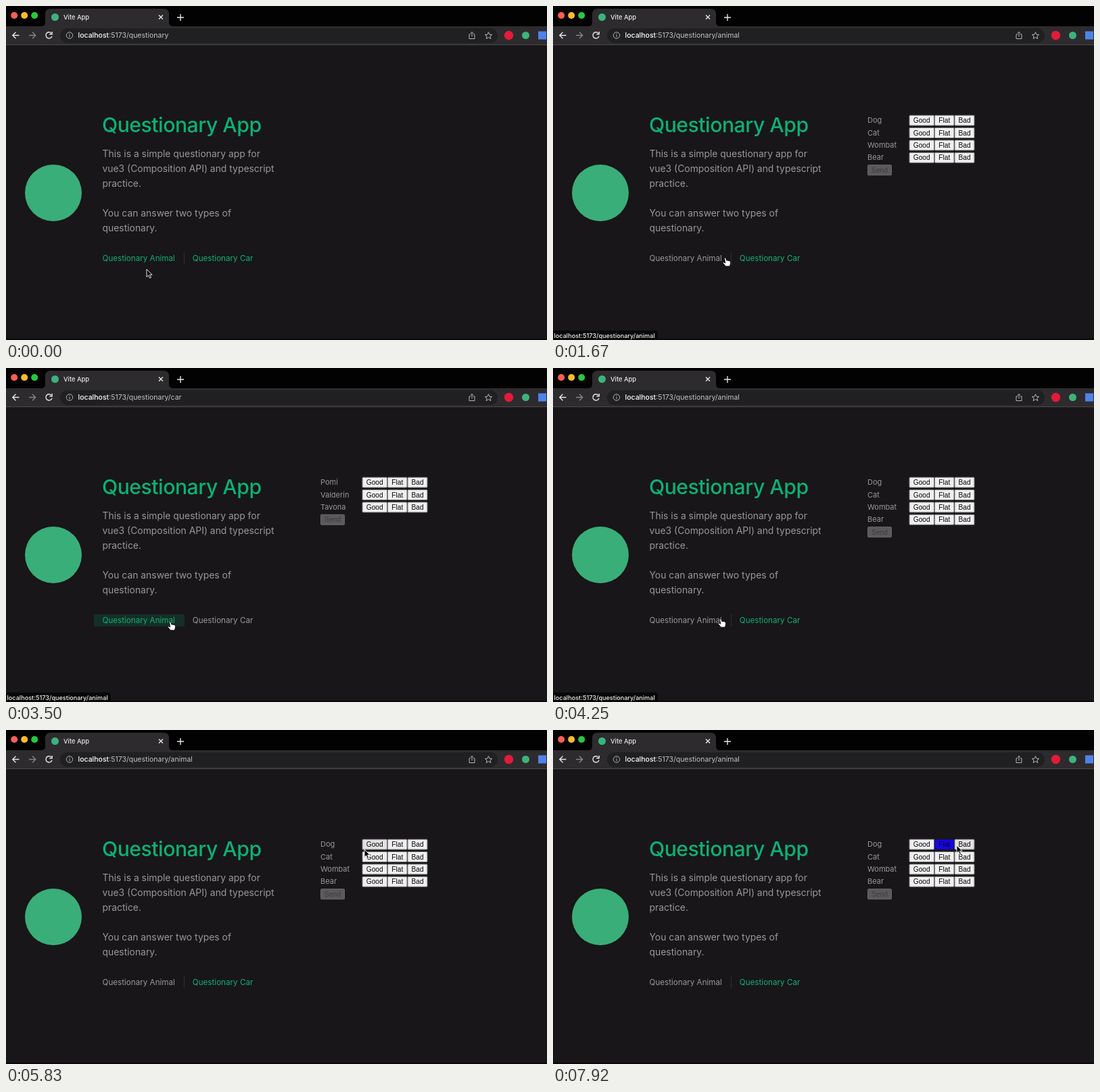
Recreate the animation shown at these times as an HTML page. Size 800 by 495 pixels, loop 8000 ms.

```html
<!DOCTYPE html>
<html lang="en">
<head>
<meta charset="utf-8">
<title>Questionary App</title>
<style>
  html, body { margin: 0; width: 100%; height: 100%; overflow: hidden; background: #181618; }
  svg { display: block; width: 800px; height: 495px; }
  text { font-family: Inter, "Open Sans", sans-serif; white-space: pre; }
  .button text { font: 10.2px "Liberation Sans", Arial, sans-serif; text-anchor: middle; }
  .line { fill: none; stroke: #e6e6e8; stroke-width: 1.4; }
  .title { font-size: 30.2px; font-weight: 500; letter-spacing: -.5px; fill: #0cb176; }
  .copy { font-size: 13.9px; fill: #989799; }
  .nav { font-size: 11.65px; }
  .cell { font-size: 11px; fill: #989799; }
</style>
</head>
<body>
<svg viewBox="0 0 800 495">
  <rect width="800" height="495" fill="#181618"/>
  <rect y="493" width="800" height="2" fill="#09080a"/>

  <rect width="800" height="30" fill="#020203"/>
  <path d="M52 30q6 0 6-6V12q0-8 8-8H233q8 0 8 8v12q0 6 6 6z" fill="#2d2b2e"/>
  <rect y="30" width="800" height="27" fill="#2d2b2e"/>
  <rect y="57" width="800" height="1" fill="#4a494c"/>
  <circle cx="12.200" cy="14" r="5" fill="#ff5d55"/>
  <circle cx="27.200" cy="14" r="5" fill="#fcbb2d"/>
  <circle cx="42.200" cy="14" r="5" fill="#27c83f"/>
  <circle cx="72.500" cy="16.500" r="5.500" fill="#3cb37d"/>
  <text x="85" y="20" font-size="9.300" font-weight="500" fill="#e9e9eb">Vite App</text>
  <path class="line" d="M226 13.500l6 6m0-6l-6 6"/>
  <path class="line" d="M258 12v10m-5-5h10"/>

  <path class="line" d="M19.500 43.500h-9.500m4.500-4.700l-4.700 4.700 4.700 4.700"/>
  <path class="line" style="stroke:#858487" d="M34 43.500h9.500m-4.500-4.700l4.700 4.700-4.700 4.700"/>
  <path class="line" d="M67 40.200a4.600 4.600 0 1 0 1 4.600M68.200 38v3.800h-3.800"/>
  <rect x="80" y="33" width="647" height="22" rx="11" fill="#201f22"/>
  <g class="line" style="stroke:#b4b4b8;stroke-width:1">
    <circle cx="94" cy="43.500" r="4.700"/>
    <path d="M94 42.800v3.400m0-5.600v1.200"/>
    <path d="M687 42h-2v6.500h8V42h-2m-2 3.500V38.500m-2 2l2-2 2 2"/>
    <path d="M713.500 38.700l1.500 3.500 3.700.3-2.800 2.400.9 3.600-3.300-2-3.300 2 .9-3.600-2.800-2.400 3.700-.3z"/>
  </g>
  <text x="106.500" y="47.300" font-size="10.500" fill="#c2c2c5"><tspan fill="#fff" font-weight="500">localhost</tspan><tspan id="path"></tspan></text>
  <circle cx="743.500" cy="43.500" r="6.700" fill="#e31b39"/>
  <circle cx="768.500" cy="43.500" r="5.500" fill="#3cb37d"/>
  <rect x="787" y="37.500" width="12" height="12" fill="#4f82e8"/>

  <circle cx="70" cy="277" r="42" fill="#3aae78"/>
  <text class="title" x="142" y="187">Questionary App</text>
  <g class="copy">
    <text x="142.500" y="223.700">This is a simple questionary app for</text>
    <text x="142.500" y="245.700">vue3 (Composition API) and typescript</text>
    <text x="142.500" y="267.700">practice.</text>
    <text x="142.500" y="311.700">You can answer two types of</text>
    <text x="142.500" y="333.700">questionary.</text>
  </g>
  <rect id="divider" x="263" y="365" width="1" height="18" fill="#302f32"/>
  <g class="nav">
    <rect id="animalGlow" x="130" y="365" width="134" height="18" fill="#00bd7e"/>
    <rect id="carGlow" x="263" y="365" width="115" height="18" fill="#00bd7e"/>
    <text id="animalLink" x="142.500" y="378.300">Questionary Animal</text>
    <text id="carLink" x="275.800" y="378.300">Questionary Car</text>
  </g>

  <g id="animalTable"></g>
  <g id="carTable"></g>

  <g id="status">
    <path id="bubble" fill="#070708"/>
    <text id="statusText" x="1.500" y="491.700" font-size="9.150" font-weight="500" fill="#f2f2f3"></text>
  </g>

  <path id="arrow" d="M0 0v11.500l2.600-2.400 1.900 4.200 2-.9-1.900-4.100h3.500z" fill="#050505" stroke="#fff" stroke-width=".9"/>
  <path id="hand" d="M-1 .8Q0-.6 1.200.8L2.300 4.300Q3.500 3.200 4.500 4.500 5.800 3.700 6.500 5 8 4.800 8 6.500L7.700 10 6.700 12.800H.8L-3.300 7.800Q-3.200 6.300-1.500 6.900L.2 8z" fill="#fff" stroke="#080808" stroke-width=".9"/>
</svg>
<script>
const LOOP = 8000, STEP = 1000 / 12;
const CLICK = { animal: 1080, car: 2450, animalAgain: 3800, good: 6660, flat: 7300 };
const ENTER = { animal: 460, car: 1860, animalAgain: 2900 };
const BUTTONS = [["Good", 526.5, 37.5], ["Flat", 564, 29.5], ["Bad", 593.5, 30]];
const ROW_Y = 161.6, ROW_GAP = 18.4;

// time, x, y of the pointer tip
const PATH = [
  [0, 208, 390], [250, 208, 389], [650, 207, 374], [1250, 210, 373],
  [1670, 254.5, 373], [2100, 304, 371], [2500, 306, 369.5], [2700, 303, 370],
  [3150, 246, 375], [3500, 242.5, 376], [4170, 242, 375], [4400, 262, 362],
  [5080, 524, 181], [5670, 530, 177], [5830, 530, 177], [6250, 536, 172],
  [6830, 536, 172], [7180, 574, 172], [7500, 575, 172], [7920, 597, 171]
];

const $ = id => document.getElementById(id);
const clamp = v => Math.max(0, Math.min(1, v));
const smooth = v => v * v * (3 - 2 * v);
const fade = (t, start) => smooth(clamp((t - start) / 400));
const mix = (a, b, k) => `rgb(${a.map((v, i) => Math.round(v + (b[i] - v) * k))})`;

function add(parent, tag, attrs, text = "") {
  const node = document.createElementNS("http://www.w3.org/2000/svg", tag);
  for (const key in attrs) node.setAttribute(key, attrs[key]);
  node.textContent = text;
  return parent.appendChild(node);
}

function addButton(parent, label, x, y, width, fill, stroke, color) {
  const group = add(parent, "g", { class: "button" });
  const box = add(group, "rect", { x: x + .5, y: y + .5, width: width - 1, height: 15, rx: 1, fill, stroke });
  add(group, "text", { x: x + width / 2, y: y + 11.5, fill: color }, label);
  return { box, x, y, width };
}

function buildTable(id, names) {
  const buttons = [];
  names.forEach((name, row) => {
    const y = ROW_Y + row * ROW_GAP;
    add($(id), "text", { class: "cell", x: 465, y: y + 11.6 }, name);
    for (const [label, x, width] of BUTTONS)
      buttons.push(addButton($(id), label, x, y, width, "#efefef", "#77767a", "#080808"));
  });
  addButton($(id), "Send", 465, ROW_Y + names.length * ROW_GAP, 36, "#5a595b", "#69686b", "#3d3c3e");
  return buttons;
}

const animalButtons = buildTable("animalTable", ["Dog", "Cat", "Wombat", "Bear"]);
buildTable("carTable", ["Pomi", "Valderin", "Tavona"]);

function pointerAt(t) {
  const next = PATH.findIndex(p => p[0] > t);
  if (next < 0) return PATH[PATH.length - 1].slice(1);
  const [a, b] = [PATH[next - 1], PATH[next]];
  const k = smooth((t - a[0]) / (b[0] - a[0]));
  return [a[1] + (b[1] - a[1]) * k, a[2] + (b[2] - a[2]) * k];
}

function styleLink(name, active, glow) {
  $(name + "Link").setAttribute("fill", mix([22, 174, 118], [152, 151, 153], active));
  $(name + "Glow").setAttribute("opacity", .15 * glow);
}

function show(id, visible) {
  $(id).setAttribute("visibility", visible ? "visible" : "hidden");
}

function drawButtons(t, x, y) {
  const selected = t >= CLICK.flat ? 1 : t >= CLICK.good ? 0 : -1;
  animalButtons.forEach(({ box, x: left, y: top, width }, i) => {
    const over = x >= left && x < left + width && y >= top && y < top + 16;
    box.setAttribute("fill", i === selected ? "#1604ec" : over ? "#e2e2e3" : "#efefef");
    box.setAttribute("stroke", i === selected ? "#17152f" : "#77767a");
  });
}

function drawStatus(t) {
  const target = t < ENTER.animal || t >= 4500 ? ""
    : t >= ENTER.car && t < ENTER.animalAgain ? "car" : "animal";
  show("status", target);
  $("statusText").textContent = target && "localhost:5173/questionary/" + target;
  const right = target === "car" ? 141 : 155;
  $("bubble").setAttribute("d", `M0 481H${right - 4}q4 0 4 4V495H0z`);
}

function draw(t) {
  const page = t < CLICK.animal ? "" : t >= CLICK.car && t < CLICK.animalAgain ? "car" : "animal";
  $("path").textContent = ":5173/questionary" + (page && "/" + page);
  show("animalTable", page === "animal");
  show("carTable", page === "car");

  const toAnimal = fade(t, CLICK.animal), toCar = fade(t, CLICK.car), back = fade(t, CLICK.animalAgain);
  const animalGlow = fade(t, ENTER.animal) - toAnimal + fade(t, ENTER.animalAgain) - back;
  styleLink("animal", toAnimal - toCar + back, animalGlow);
  styleLink("car", toCar - back, fade(t, ENTER.car) - toCar);
  $("divider").setAttribute("opacity", 1 - animalGlow);

  const [x, y] = pointerAt(t);
  const onLink = x >= 130 && x < 378 && y >= 365 && y < 384;
  for (const id of ["arrow", "hand"]) $(id).setAttribute("transform", `translate(${x} ${y})`);
  show("hand", onLink);
  show("arrow", !onLink);
  drawButtons(t, x, y);
  drawStatus(t);
}

const start = performance.now();
function tick(now) {
  const t = Math.max(0, now - start) % LOOP;
  draw(Math.floor((t + 4) / STEP) * STEP);
  requestAnimationFrame(tick);
}
draw(0);
requestAnimationFrame(tick);
</script>
</body>
</html>
```
